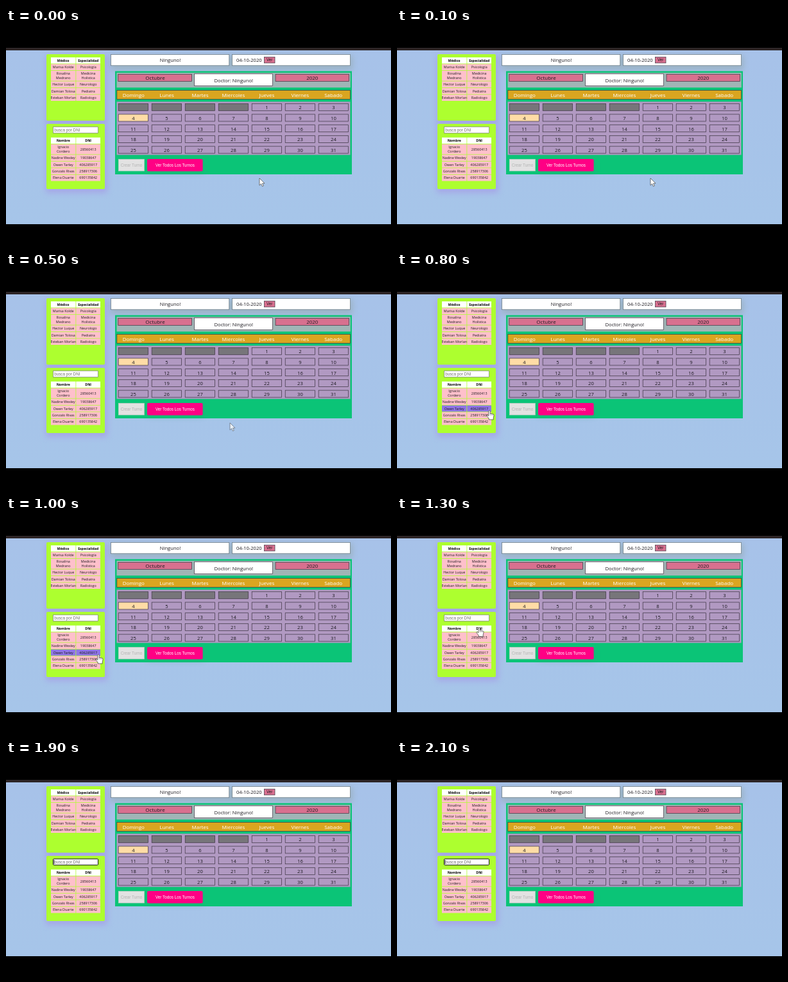
An HTML page that plays this animation: 600x338 px, repeating every 2200 ms.

```html
<!DOCTYPE html>
<html lang="es">
<head>
<meta charset="utf-8">
<title>Turnos</title>
<style>
  html, body { margin: 0; width: 100%; height: 100%; overflow: hidden; background: #000; }
  svg { display: block; width: 600px; height: 338px; }
  text { font-family: "Open Sans", "Noto Sans", sans-serif; text-anchor: middle; fill: #1c1a20; }
  .head { font-weight: 700; fill: #000; }
  .light { fill: #fff; }
  .ui { font-family: "Liberation Sans", Arial, sans-serif; }
  .start { text-anchor: start; }
  .glow { filter: blur(5px); }
</style>
</head>
<body>
<svg id="stage" viewBox="0 0 600 338">
  <defs>
    <linearGradient id="sky" x2="0" y2="1">
      <stop stop-color="#a7c2e9"/>
      <stop offset="1" stop-color="#a6c5e9"/>
    </linearGradient>
  </defs>
  <rect width="600" height="338"/>
  <rect y="31" width="600" height="4" fill="#2d2526"/>
  <rect y="35" width="600" height="272" fill="url(#sky)"/>
  <g id="page"></g>
  <g id="arrow">
    <path d="M0 0V11.2L2.6 8.8L4.4 12.8L6.3 12L4.5 8.1H8Z" fill="#fff" stroke="#444" stroke-width=".7"/>
  </g>
  <g id="hand">
    <path d="M-1.2 1Q0-.8 1.2 1V5.3L2 4.8L3.3 5.4L4.2 5.2L5.4 6L6.3 6Q7.2 6.4 7.1 8L6.2 12V14.5H-.8V12.8L-4.2 8.5Q-4.2 6.9-2.8 7.4L-1.2 8.8Z" fill="#fff" stroke="#333" stroke-width=".7"/>
    <path d="M1.2 5.3V8M3.3 5.6V8M5.4 6.2V8.2" fill="none" stroke="#555" stroke-width=".5"/>
  </g>
</svg>
<script>
const $ = id => document.getElementById(id);
const page = $("page");
const INK = "#3b3340", ROSE = "#d8708f", PINK = "#ffc0cb", LILAC = "#b199c2";
const TINY = 5.4, UI = 6.3, BODY = 7.6, LARGE = 8;

function add(tag, attrs, content) {
  const el = document.createElementNS("http://www.w3.org/2000/svg", tag);
  for (const key in attrs) el.setAttribute(key, attrs[key]);
  if (content) el.textContent = content;
  return page.appendChild(el);
}

// Boxes are given by their left, top, right and bottom edges.
function box(l, t, r, b, fill, more) {
  return add("rect", { x: l, y: t, width: r - l, height: b - t, fill, ...more });
}

const outline = (l, t, r, b, fill, stroke = INK) =>
  box(l, t, r, b, fill, { stroke, "stroke-width": .7 });

const glow = (l, t, r, b, fill, opacity) =>
  box(l, t, r, b, fill, { class: "glow", opacity });

function label(str, x, mid, size = BODY, cls = "") {
  return add("text", { x, y: mid + size * .36, "font-size": size, class: cls }, str);
}

function panel(t, b) {
  glow(62, t + 1, 158, b + 6, "#a48ae4", .5);
  box(63, t, 154, b, "#adff2f", { rx: 2 });
}

// Returns each body row with its extent and cells.
function table(top, heads, rows) {
  const cols = [[70, 108.5], [109.3, 147]];
  const mids = [89.2, 128.2];
  cols.forEach(([l, r], i) => {
    box(l, top, r, top + 9.6, "#fff");
    label(heads[i], mids[i], top + 4.9, 5.2, "head");
  });
  let y = top + 10.4;
  return rows.map(row => {
    const lines = row.map(cell => cell.split("/"));
    const h = Math.max(...lines.map(l => l.length)) > 1 ? 15.8 : 9.7;
    const cells = cols.map(([l, r], i) => {
      const cell = box(l, y, r, y + h, PINK);
      lines[i].forEach((str, n) =>
        label(str, mids[i], y + h / 2 + (n - (lines[i].length - 1) / 2) * 7, TINY));
      return cell;
    });
    const item = { top: y, bottom: y + h, cells };
    y += h + .75;
    return item;
  });
}

panel(41, 145);
panel(150, 252);

table(46, ["Médico", "Especialidad"], [
  ["Marisa Kolde", "Psicología"],
  ["Rosalina/Medrano", "Medicina/Holística"],
  ["Hector Luque", "Neurologo"],
  ["Damian Tolosa", "Pediatra"],
  ["Esteban Morlan", "Radiologo"]
]);

const field = outline(73.5, 154.8, 143.5, 164.3, "#fff", "#777");
label("busca por DNI", 75.2, 159.6, UI, "ui start").style.fill = "#757575";
const caret = box(74.7, 156.2, 75.4, 163, "#000");
const patients = table(171.4, ["Nombre", "DNI"], [
  ["Ignacio/Cordero", "28560413"],
  ["Nadine Wexley", "19038647"],
  ["Owen Tarley", "406285917"],
  ["Gonzalo Rivas", "258917306"],
  ["Elena Duarte", "690135842"]
]);

glow(163, 43, 540, 66, "#93a9ae", .6);
outline(163.5, 41.5, 347.8, 58.8, "#fff", "#62717a");
label("Ninguno!", 256, 50.7);
outline(352.5, 41.5, 536.5, 58.8, "#fff", "#62717a");
label("04-10-2020", 359, 50.4, BODY, "start");
outline(402.5, 45.5, 419, 54.8, ROSE);
label("Ver", 410.7, 50.2, UI, "ui");

box(170, 67.5, 539, 229, "#0bc477");
box(172.5, 70, 536.8, 93.2, "#a0b5b6");
outline(174.8, 72.3, 289.5, 83.4, ROSE);
label("Octubre", 232.5, 78.3, LARGE);
outline(293.6, 71.8, 415.5, 90.6, "#fff");
label("Doctor: Ninguno!", 354.8, 82);
outline(420, 72.3, 534.4, 83.4, ROSE);
label("2020", 477.3, 78.3, LARGE);

outline(172.8, 97.6, 536.4, 111.4, "#daa520");
box(172.5, 115.3, 536.5, 198.6, LILAC);
["Domingo", "Lunes", "Martes", "Miercoles", "Jueves", "Viernes", "Sabado"]
  .forEach((day, i) => label(day, 198.8 + i * 51.9, 104.7, LARGE, "light"));

const BLANKS = 4, TODAY = 4;
for (let i = 0; i < 35; i++) {
  const x = 175.2 + i % 7 * 52, y = 118.3 + Math.floor(i / 7) * 16.7;
  const day = i - BLANKS + 1;
  outline(x, y, x + 46.3, y + 11, day < 1 ? "#77757a" : day === TODAY ? "#ffdca6" : LILAC);
  if (day > 0) label(String(day), x + 23.2, y + 6.1);
}

outline(175.3, 205.3, 215.4, 223.8, "#e2e2e2", "#c4c9c6");
label("Crear Turno", 195.5, 214.6, UI, "ui").style.fill = "#b3b3b3";
glow(221, 207, 308, 226, "#3a9a78", .35);
box(220, 205, 306.6, 224.3, "#ff0084", { rx: 2 });
label("Ver Todos Los Turnos", 263.4, 214.6, UI, "ui light");

// Pointer path: time, x, y.
const path = [
  [0, 395, 235], [400, 395, 235], [500, 349, 236], [600, 254, 232],
  [700, 175, 224], [800, 144, 216.5], [1000, 144, 216.5],
  [1300, 128, 174], [1500, 108, 160]
];
const LOOP = 2200, STEP = 100;

function pointer(t) {
  const n = path.findIndex(p => p[0] > t);
  if (n < 0) return path[path.length - 1].slice(1);
  const [a, b] = [path[n - 1], path[n]];
  const k = (t - a[0]) / (b[0] - a[0]);
  return [1, 2].map(i => a[i] + (b[i] - a[i]) * k);
}

function draw(now) {
  const t = Math.floor(now % LOOP / STEP) * STEP;
  const [x, y] = pointer(t);
  const pointing = t >= 800 && t < 1500;
  const focus = t >= 1600;

  for (const id of ["arrow", "hand"]) $(id).setAttribute("transform", `translate(${x} ${y})`);
  $("arrow").style.opacity = t < 500 ? 1 : t < 800 ? .75 : 0;
  $("hand").style.opacity = pointing ? 1 : 0;

  for (const row of patients) {
    const over = pointing && y >= row.top && y < row.bottom + .75;
    for (const cell of row.cells) cell.setAttribute("fill", over ? "#8f76e6" : PINK);
  }

  field.setAttribute("stroke", focus ? "#101010" : "#777");
  field.setAttribute("stroke-width", focus ? 1 : .7);
  field.setAttribute("rx", focus ? 1 : 0);
  caret.style.opacity = focus ? 1 : 0;
}

const begin = performance.now();
function tick() {
  draw(performance.now() - begin);
  requestAnimationFrame(tick);
}
tick();
</script>
</body>
</html>
```
